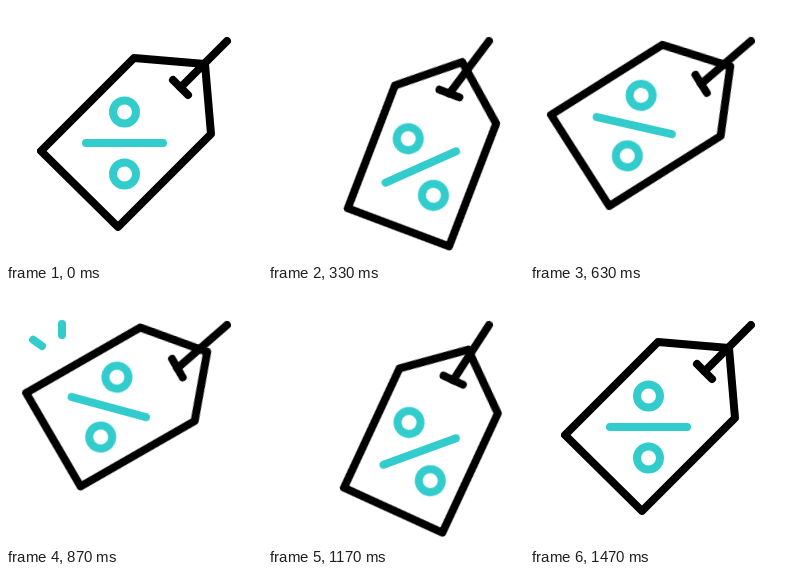
Write an HTML page that moves like this. It is 256 px wide and 256 px high and loops after 2000 ms.

```html
<!DOCTYPE html>
<html lang="en">
<head>
<meta charset="utf-8">
<title>Swinging price tag</title>
<style>
  html, body { margin: 0; height: 100%; overflow: hidden; background: #fff; }
  svg { display: block; width: 100vw; height: 100vh; }
  svg * { transform-box: view-box; }
  g { fill: none; stroke-width: 8; stroke-linecap: round; stroke-linejoin: round; }
  .ink { stroke: #000; }
  .accent { stroke: #33cccc; }

  .string, .tag { animation: 2s cubic-bezier(.333, 0, .667, 1) infinite; }
  .string { transform-origin: 221px 35px; animation-name: swing; }
  .tag { transform-origin: 174.5px 81.5px; animation-name: tilt; }

  @keyframes swing {
    0% { transform: rotate(0deg); }
    16.667% { transform: rotate(-8deg); }
    38.333% { transform: rotate(8deg); }
    56.667% { transform: rotate(-12.5deg); }
    73.333%, 100% { transform: rotate(0deg); }
  }
  @keyframes tilt {
    0% { transform: rotate(0deg); }
    16.667% { transform: rotate(-16deg); }
    38.333% { transform: rotate(16deg); }
    56.667% { transform: rotate(-8.3deg); }
    73.333%, 100% { transform: rotate(0deg); }
  }

  .sparks {
    stroke-dasharray: 16 32;
    animation: dash 2s cubic-bezier(.333, 0, .667, 1) infinite, show 2s step-end infinite;
  }
  @keyframes dash {
    0%, 38.333% { stroke-dashoffset: 16; }
    46.667% { stroke-dashoffset: 0; }
    56.667%, 100% { stroke-dashoffset: -16; }
  }
  @keyframes show {
    0% { visibility: hidden; }
    38.9% { visibility: visible; }
    56.5%, 100% { visibility: hidden; }
  }
</style>
</head>
<body>
<svg viewBox="0 0 256 256">
  <g class="accent sparks">
    <path pathLength="16" d="M56 45V29"/>
    <path pathLength="16" d="M36 56L23 47"/>
  </g>
  <g class="string">
    <g class="tag">
      <path class="ink" d="M128 52L199 58L205 128L112 221L35 145Z"/>
      <g class="accent">
        <circle cx="118.5" cy="106" r="11.5"/>
        <path d="M80 137H157"/>
        <circle cx="118.5" cy="168" r="11.5"/>
      </g>
      <path class="ink" d="M167 74L182 89"/>
    </g>
    <path class="ink" d="M221 35L174.5 81.5"/>
  </g>
</svg>
</body>
</html>
```
